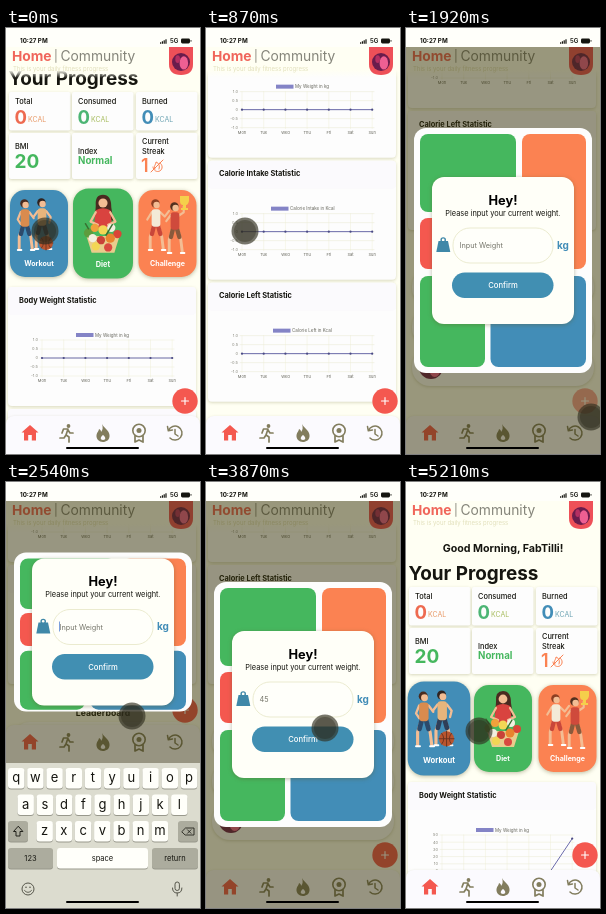
These frames come from a looping animation (194 by 426 pixels, 5.25 s). An HTML page:

```html
<!DOCTYPE html>
<html lang="en">
<head>
<meta charset="utf-8">
<title>Fitness tracker</title>
<style>
  html, body { margin: 0; width: 100%; height: 100%; overflow: hidden; background: #fffff3; }
  svg { display: block; width: 194px; height: 426px; }
  text { font-family: Inter, "Open Sans", sans-serif; white-space: pre; }
  .card { fill: #fdfdfd; filter: drop-shadow(0 1px 1.5px rgba(110, 110, 50, .28)); }
  .nav { fill: #fbfafe; }
  .big { filter: drop-shadow(0 1px 2px rgba(90, 90, 40, .4)); }
  .key { filter: drop-shadow(0 1px 0 #98988c); }
  .line { fill: none; stroke-linecap: round; stroke-linejoin: round; }
</style>
</head>
<body>
<svg id="stage" viewBox="0 0 194 426" xmlns="http://www.w3.org/2000/svg"></svg>
<script>
const LOOP = 5250;
const RED = '#f4584f', ORANGE = '#fb8252', GREEN = '#45b75e', BLUE = '#428db7';
const INK = '#15150f', OLIVE = '#827d5e', PURPLE = '#6c6cac', SKIN = '#f3bd94', PAPER = '#fffff3';
const DAYS = ['Mon', 'Tue', 'Wed', 'Thu', 'Fri', 'Sat', 'Sun'];

// y is the middle of the capitals
const text = (x, y, size, str, fill = INK, weight = 400, anchor = 'start') =>
  `<text x="${x}" y="${(y + size * .36).toFixed(2)}" font-size="${size}" fill="${fill}" font-weight="${weight}" text-anchor="${anchor}">${str}</text>`;
const rect = (x, y, w, h, r, fill, extra = '') =>
  `<rect x="${x}" y="${y}" width="${w}" height="${h}" rx="${r}" ${fill ? `fill="${fill}"` : ''} ${extra}/>`;
const dot = (x, y, r, fill, extra = '') => `<circle cx="${x}" cy="${y}" r="${r}" fill="${fill}" ${extra}/>`;
const line = (d, stroke, w = 1) => `<path class="line" d="${d}" stroke="${stroke}" stroke-width="${w}"/>`;
const shape = (d, fill) => `<path d="${d}" fill="${fill}"/>`;
const at = (x, y, body, scale = 1) => `<g transform="translate(${x} ${y}) scale(${scale})">${body}</g>`;
const group = (id, body) => `<g id="${id}">${body}</g>`;
const card = (x, y, w, h, r) => rect(x, y, w, h, r, '', 'class="card"');

const avatar = (x, y, r) => dot(x, y, r, '#6a1c4c') +
  at(x, y, `<ellipse cx="3" cy="1" rx="4.5" ry="7" fill="#ee5f92"/><ellipse cx="-3.5" cy="-3" rx="2.5" ry="4" fill="#b52f62"/>`, r / 9.5);

// ---- summary cards ----
function kcal(x, label, fill, unit) {
  return card(x, 105, 61.5, 38.5, 2) + text(x + 6, 114, 7.4, label, INK, 500) +
    text(x + 5.5, 130, 18.5, '0', fill, 700) + text(x + 19, 132.5, 7, 'KCAL', unit);
}
const streakIcon = at(151, 179,
  line('M-4 1a4.6 4.6 0 1 0 7 -4M-2 3c-2 -3 1 -4 1 -7c3 1 4 4 3 7M-6 6L6 -6', ORANGE, 1));
const summary =
  text(97, 66, 10.7, 'Good Morning, FabTilli!', INK, 700, 'middle') +
  text(2.5, 91, 18.9, 'Your Progress', INK, 700) +
  kcal(3, 'Total', '#ee6a50', '#e89a68') + kcal(66, 'Consumed', '#4cb574', '#a8bd60') + kcal(130, 'Burned', BLUE, '#6fa5b4') +
  [3, 66, 130].map(x => card(x, 146, 61.5, 46, 2)).join('') +
  text(9, 159, 7.4, 'BMI', INK, 500) + text(8.5, 174, 19, '20', GREEN, 700) +
  text(72, 164, 7.4, 'Index', INK, 500) + text(72, 174, 9.7, 'Normal', GREEN, 700) +
  text(136, 154, 7.4, 'Current', INK, 500) + text(136, 164, 7.4, 'Streak', INK, 500) +
  text(135, 179, 18, '1', ORANGE, 600) + streakIcon;

// ---- activity tiles ----
const person = (x, y, top, legs, hair, arms) => at(x, y,
  line('M-1.5 14L-4 22L-4 30M1.5 14L4 22L5 30', SKIN, 2) + line('M-1.3 14L-2.8 20M1.3 14L3 20', legs, 3) +
  line(arms, SKIN, 1.5) + rect(-3, 3, 6, 12, 2, top) +
  dot(-.4, -1, 2.9, hair) + dot(.4, 0, 2.2, SKIN) + line('M-5 31h2.500M4 31h2.500', '#fff', 1.3), 1.45);
const workoutArt =
  person(19, 218, '#d98b4e', '#2c4a6b', '#4a2c20', 'M-3 5L-5 10L-3 13M3 5L6 9') +
  person(36, 217, '#e8b57c', '#2f3e58', '#2f2320', 'M-3 5L-6 9M3 5L6 9L5 13') +
  dot(40, 256, 7, '#b9552f') + line('M33 256h14M40 249v14M35.500 251q4 5 0 10M44.500 251q-4 5 0 10', '#643020', .8);
const dietArt =
  shape('M90 220q-1 -11 7 -11q8 0 8 12l2 13h-18z', '#4a2a20') + dot(97, 217, 4.4, SKIN) +
  shape('M90 224q7 -4 14 0l2 17h-18z', '#d9433f') + line('M90 226L85 235L92 238M104 226L109 235L102 238', SKIN, 2.2) +
  shape('M81 249h32l-5 16h-22z', '#e9cc8c') +
  [[83, 246, 4.5, '#5d9c3d'], [89, 241, 4, '#f0a13c'], [97, 243, 4.5, '#f3d655'], [105, 241, 4, '#f2efe0'],
   [111, 247, 4, '#da4437'], [87, 251, 4, '#f2efe0'], [95, 253, 4, '#c84238'], [104, 251, 4.5, '#e8842e'],
   [90, 259, 4, '#f3d655'], [102, 260, 4, '#d94940']].map(c => dot(...c)).join('') +
  line('M100 248l6 -10M83 242l-3 -5', '#386f31', 1.4);
const challengeArt =
  person(150, 218, '#f3ead7', '#c9473a', '#8c3f22', 'M-3 5L-6 10M3 5L6 8L9 4') +
  person(169, 221, '#cf4a3c', '#8a5a3c', '#54301f', 'M-3 5L-6 9M3 5L6 3L6 -1') +
  shape('M174 209h9v5q-1 4 -3 4v3h2v2h-7v-2h2v-3q-3 0 -3 -4z', '#f5cf4b');
const TILE_Y = 246.5;
const tileX = [33, 97, 161.5];
const tile = (i, fill, label, art) => group('tile' + i,
  rect(tileX[i] - 29, TILE_Y - 43.5, 58, 87, 15, fill, 'class="big"') + art +
  text(tileX[i], 276, 7.1, label, '#fff', 700, 'middle'));
const tiles = tile(0, BLUE, 'Workout', workoutArt) + tile(1, GREEN, 'Diet', dietArt) +
  tile(2, ORANGE, 'Challenge', challengeArt);

// ---- charts ----
const dayX = i => 36 + i * 21.7;
function plot(values, ticks) {
  const hi = +ticks[0], lo = +ticks[ticks.length - 1];
  const y = v => 389 - (v - lo) / (hi - lo) * 36;
  const pts = values.map((v, i) => [dayX(i), y(v)]);
  return line(values.map((v, i) => `M${dayX(i)} 353V390`).join(''), '#efefd8', .5) +
    ticks.map(t => line(`M34 ${y(+t)}H168`, '#e9e9d0', .5) + text(32, y(+t), 4, t, '#85857a', 400, 'end')).join('') +
    line('M' + pts.map(p => p.join(' ')).join('L'), PURPLE, 1) +
    pts.map(p => dot(p[0], p[1], 1.1, '#4a4a86')).join('');
}
const flat = plot(Array(7).fill(0), ['1.0', '0.5', '0', '-0.5', '-1.0']);
function stat(i, title, legend, legendX, body) {
  return at(0, i * 122, card(2, 300, 188, 119, 4) + rect(2, 300, 188, 28, 4, '#fbfafd') +
    text(13, 313, 7.4, title, INK, 700) +
    rect(legendX, 346, 17.5, 4, 0, '#8484c6') + text(legendX + 19, 348, 4.5, legend, '#66665c') + body +
    DAYS.map((d, n) => text(dayX(n), 393.5, 4, d, '#66665c', 400, 'middle')).join(''));
}
const stats =
  stat(0, 'Body Weight Statistic', 'My Weight in kg', 70, group('before', flat) +
    group('after', plot([0, 0, 0, 0, 0, 0, 45], ['50', '40', '30', '20', '10', '0']))) +
  stat(1, 'Calorie Intake Statistic', 'Calorie Intake in Kcal', 65, flat) +
  stat(2, 'Calorie Left Statistic', 'Calorie Left in Kcal', 67, flat);

// ---- leaderboard ----
const broken = y => rect(12.5, y - 10, 25, 20, 0, 'none', 'stroke="#e2e2d2" stroke-width=".5"') +
  rect(14, y - 9, 7, 7, 1, '#d5dfe4') + shape(`M14 ${y - 2}l3 -4l4 4z`, '#72a96c');
const row = (i, name, pic) => {
  const y = 720 + i * 40;
  return card(6, y - 19, 182, 38, 18) + pic(y) + text(43, y, 6.8, name, '#476552') +
    dot(172, y, 2.8, 'none', 'stroke="#4c4c40" stroke-width=".9"') + line(`M173 ${y - 1}a1.300 1.300 0 1 0 0 2`, '#4c4c40', .7) +
    text(177, y, 6.8, '0', '#4c4c40');
};
const leaders = text(97, 692, 8.7, 'Leaderboard', INK, 700, 'middle') +
  row(0, 'Maludo', broken) + row(1, 'Teviq', broken) + row(2, 'FabTilli', y => avatar(25, y, 12));

// ---- fixed parts ----
const header = `<linearGradient id="fade" x2="0" y2="1"><stop stop-color="${PAPER}"/><stop offset="1" stop-color="${PAPER}" stop-opacity="0"/></linearGradient>` +
  rect(0, 0, 194, 42, 0, PAPER) + rect(0, 42, 194, 8, 0, 'url(#fade)') +
  text(7, 41, 6, 'This is your daily fitness progress', '#e2e0bc') +
  text(6, 28, 13.8, 'Home', '#f0665a', 700) + text(48, 27.5, 11.5, '|', '#85857a') +
  text(54.5, 28, 13.8, 'Community', '#85857a') +
  shape('M163 19h24v17q0 11 -12 11q-12 0 -12 -11z', '#ee5058') + avatar(175, 34, 9);

const icons = [
  at(24, 0, shape('M0 -8L8.500 -.5H6V7.500H1.800V2H-1.800V7.500H-6V-.5H-8.500z', RED)),
  at(60, 0, dot(2.5, -7, 1.9, OLIVE) +
    line('M-4 0L-2.500 -4L2 -4L0 2L3 4L3 9M0 2L-2 5H-6M2 -3L4 0L7 0', OLIVE, 1.7)),
  at(97, 0, shape('M-1 -9C1 -5 6 -3 6.500 2C7 7 3 9 0 9C-4 9 -7 6 -6.500 2C-6 -1 -4 -2 -4 -4C-2 -3 -2 -2 -2 -1C0 -3 0 -6 -1 -9zM0 2C-3 4 -3 7 0 7C3 7 3 4 0 2z', OLIVE)),
  at(133, 0, dot(0, -2.5, 6.2, 'none', `stroke="${OLIVE}" stroke-width="1.6"`) + dot(0, -2.5, 2.5, OLIVE) +
    line('M-4 3V9L0 7L4 9V3', OLIVE, 1.7)),
  at(169, 0, line('M-6.500 -2.500A7 7 0 1 1 -5 5M-7.500 -6.500L-6.700 -2.200L-2.500 -3M0 -3.500V1L3 3', OLIVE, 1.5))
];
const nav = rect(0, 388, 194, 46, 8, '', 'class="card nav"') + at(0, 405, icons.join(''));
const fab = dot(179, 373, 12.7, RED) + line('M175.500 373h7M179 369.500v7', '#fff', 1.1);

const status = rect(0, 0, 194, 19, 0, '#fffffa') + text(14, 13, 6.2, '10:27 PM', INK, 700) +
  [0, 1, 2, 3].map(i => rect(154 + i * 1.8, 14.2 - i, 1.2, 1.5 + i, .3, INK)).join('') +
  text(164, 13, 6.2, '5G', INK, 600) +
  rect(175, 10.5, 9, 5, 1.4, INK) + rect(184.6, 12, .8, 1.8, .4, INK);

// ---- weight dialog; panel blocks: x, width, top, height, colour ----
const blocks = [
  [14, 96, 6, 78, GREEN], [116, 64, 6, 135, ORANGE], [14, 96, 90, 51, RED],
  [14, 65, 148, 91, GREEN], [84.5, 95.5, 148, 91, BLUE]
];
const panel = rect(8, 0, 178, 245, 12, '#fdfdfd', 'id="sheet"') +
  blocks.map(([x, w, y, h, c]) => rect(x, y, w, h, 8, c, 'class="block"')).join('');
const dialog = rect(26, 149, 142, 147, 12, '#fffff8', 'class="big"') +
  text(97, 172, 12.8, 'Hey!', '#000', 700, 'middle') +
  text(97, 185, 7.4, 'Please input your current weight.', INK, 400, 'middle') +
  shape('M32.500 213h9.500l2.300 11h-14z', '#3f88a8') + dot(37.2, 212, 2.1, 'none', 'stroke="#3f88a8" stroke-width="1.4"') +
  rect(47, 200, 100, 35, 17, '#fffffa', 'stroke="#e6e6c6" stroke-width=".8"') +
  `<g id="entry">${text(53.5, 217.5, 7.3, '', '#77776c')}</g>` +
  rect(53, 212, .7, 10, 0, '#4478d0', 'id="caret"') +
  text(151, 217, 10, 'kg', BLUE, 700) + rect(46, 244.500, 101.5, 25.5, 12.7, '#418fb2') +
  text(97, 257.5, 7.7, 'Confirm', '#fff', 500, 'middle');

// ---- keyboard ----
const key = (x, y, w, label, fill = '#fffffa', size = 13) => rect(x, y, w, 20.5, 3, fill, 'class="key"') +
  text(x + w / 2, y + 9.8, size, label, INK, 400, 'middle');
const keyRow = (chars, x, y, w = 16.4, step = 19.2) => [...chars].map((c, i) =>
  key(+(x + i * step).toFixed(1), y, w, c.replace('&', '&amp;'))).join('');
const GREY = '#acac9e';
const letters = keyRow('qwertyuiop', 2, 286) + keyRow('asdfghjkl', 11.5, 312.5) + keyRow('zxcvbnm', 30.5, 339) +
  key(2, 339, 20, '', GREY) + line('M12 344.500l-4.500 5h2.500v4.500h4v-4.500h2.500z', INK, .9);
const digits = keyRow('1234567890', 2, 286) + keyRow('-/:;()$&@"', 2, 312.5) + keyRow(".,?!'", 30.5, 339, 24, 26.9) +
  key(2, 339, 20, '#+=', GREY, 6.5);
const keyboard = rect(0, 281, 194, 145, 0, '#dcdccf') + group('letters', letters) + group('digits', digits) +
  key(172, 339, 20, '', GREY) + line('M176 349.500l3.500 -3.500h8.500v7h-8.500zM181.500 347.800l3.500 3.500M185 347.800l-3.500 3.500', INK, .8) +
  rect(2, 366, 45, 20.5, 3, GREY, 'class="key"') + group('mode', text(24.5, 376, 7.5, '123', INK, 400, 'middle')) +
  key(51, 366, 91, 'space', '#fffffa', 7.5) + key(146, 366, 46, 'return', GREY, 7.5) +
  dot(22, 407, 6, 'none', 'stroke="#55554a" stroke-width="1"') + dot(20, 405.3, .8, '#55554a') + dot(24, 405.3, .8, '#55554a') +
  line('M18.500 408.500q3.500 4 7 0', '#55554a', .9) +
  rect(169, 400, 4.4, 8.5, 2.2, 'none', 'stroke="#55554a" stroke-width="1"') + line('M166.500 406q0 5 4.700 5q4.700 0 4.700 -5M171.200 411v3', '#55554a', 1);

const stage = document.getElementById('stage');
stage.innerHTML = rect(0, 0, 194, 426, 0, PAPER) +
  group('page', summary + tiles + stats + leaders) + header +
  group('dock', nav + group('fab', fab)) +
  rect(0, 19, 194, 407, 0, 'rgb(52,48,6)', 'id="dim"') +
  group('modal', group('panel', panel) + group('dialog', dialog)) +
  group('keyboard', keyboard) + status + rect(60, 419, 73, 2, 1, '#000') +
  group('cursor', dot(0, 0, 13.5, 'rgba(50,48,34,.66)') + dot(0, 0, 11, 'rgba(36,34,20,.35)'));

// ---- motion ----
const $ = id => document.getElementById(id);
const linear = p => p, easeIn = p => p * p, easeOut = p => 1 - (1 - p) ** 2, smooth = p => p * p * (3 - 2 * p);
const ramp = (t, a, b) => Math.min(1, Math.max(0, (t - a) / (b - a)));
const move = (id, x, y) => $(id).setAttribute('transform', `translate(${x.toFixed(2)} ${y.toFixed(2)})`);
const show = (id, on) => { $(id).style.display = on ? '' : 'none'; };

const scrollSteps = [[0, 41], [540, 117, easeIn], [1120, 419, linear], [1340, 461, easeOut], [4480, 461], [5140, 0, smooth], [LOOP, 0]];
const cursorSteps = [[0, 39, 203], [1250, 39, 203], [1650, 179, 376], [1920, 185, 389], [2200, 100, 218], [2340, 100, 218],
  [2540, 126, 234], [2780, 24, 376], [2860, 24, 376], [2980, 67, 297], [3060, 67, 297], [3140, 87, 297], [3220, 87, 297],
  [3440, 150, 250], [3620, 150, 250], [3870, 119, 246], [4020, 98, 257], [4460, 98, 257], [4680, 73, 249], [LOOP, 73, 249]];

function sample(steps, t, i, ease) {
  const n = Math.max(1, steps.findIndex(s => s[0] >= t));
  const a = steps[n - 1], b = steps[n];
  return a[i] + (b[i] - a[i]) * ease(ramp(t, a[0], b[0]), b);
}

// the tiles swell one after another
function pulse(t, i) {
  const period = 1500, half = 290;
  const peak = 710 - i * 500;
  const away = ((t - peak + period * 1.5) % period) - period / 2;
  const scale = 1 + .08 * (Math.abs(away) < half ? Math.cos(away / half * Math.PI / 2) : 0);
  $('tile' + i).setAttribute('transform',
    `translate(${tileX[i]} ${TILE_Y}) scale(${scale.toFixed(4)}) translate(${-tileX[i]} ${-TILE_Y})`);
}

const blockNodes = [...document.querySelectorAll('.block')];
const entry = $('entry').firstChild, mode = $('mode').firstChild;

function draw(t) {
  const scroll = sample(scrollSteps, t, 1, (p, step) => (step[2] || linear)(p));
  move('page', 0, -scroll);
  tileX.forEach((x, i) => pulse(t, i));
  show('before', t < 4460);
  show('after', t >= 4460);

  const kb = smooth(ramp(t, 2270, 2500)) - smooth(ramp(t, 3460, 3700));
  move('dock', 0, -145 * kb);
  move('keyboard', 0, 145 * (1 - kb));
  show('keyboard', kb > 0);
  const typing = t >= 2820;
  show('letters', !typing);
  show('digits', typing);
  mode.textContent = typing ? 'ABC' : '123';
  $('fab').style.opacity = t > 1650 && t < 2060 ? .55 : 1;

  const close = ramp(t, 4120, 4300);
  const veil = ramp(t, 1680, 1800) * (1 - close);
  const pop = ramp(t, 1760, 1880) * (1 - close);
  $('dim').style.opacity = veil * .5;
  $('panel').style.opacity = veil;
  $('dialog').style.opacity = pop;
  show('modal', veil > 0);

  const height = 245 - 86 * kb, squash = height / 245;
  move('panel', 0, 222.5 - 72.5 * kb - height / 2);
  move('dialog', 0, -72.5 * kb);
  $('sheet').setAttribute('height', height);
  blockNodes.forEach((node, i) => {
    node.setAttribute('y', 6 + (blocks[i][2] - 6) * squash);
    node.setAttribute('height', blocks[i][3] * squash);
  });

  const value = t < 3020 ? '' : t < 3180 ? '4' : '45';
  entry.textContent = value || 'Input Weight';
  show('caret', t > 2260 && t < 3460 && (t - 2260) % 1000 < 560);
  $('caret').setAttribute('x', 53 + value.length * 4.6);

  move('cursor', sample(cursorSteps, t, 1, smooth), sample(cursorSteps, t, 2, smooth));
}

const start = performance.now();
function tick() {
  draw((performance.now() - start) % LOOP);
  requestAnimationFrame(tick);
}
draw(0);
requestAnimationFrame(tick);
</script>
</body>
</html>
```
